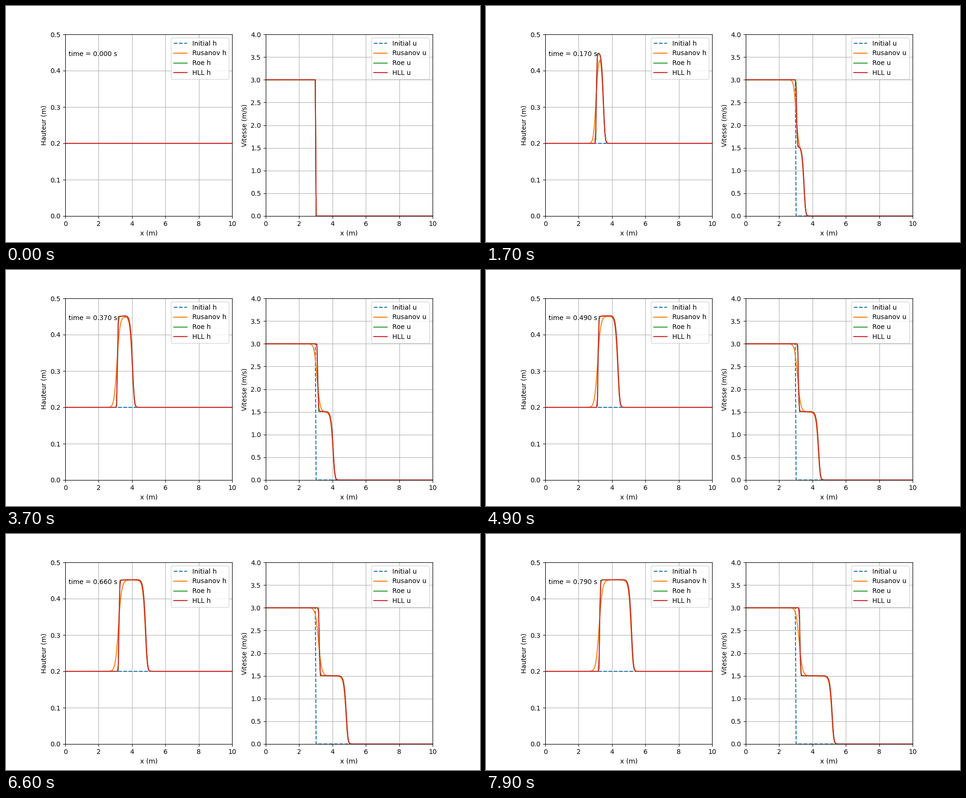
These frames come from a looping animation (1000x500 px, 8000 ms). A matplotlib script:

```python
import numpy as np
import matplotlib.pyplot as plt
from matplotlib.animation import FuncAnimation

G = 9.81
CELLS, LENGTH = 200, 10.0
DX = LENGTH / CELLS
DT, SUBSTEPS = 0.001, 10
FRAMES, INTERVAL = 80, 100

x = (np.arange(CELLS) + 0.5) * DX
h0 = np.full(CELLS, 0.2)
u0 = np.where(x < 3, 3.0, 0.0)


def flux(h, u):
    return np.array([h * u, h * u**2 + G * h**2 / 2])


def state(h, u):
    return np.array([h, h * u])


def rusanov(hl, ul, hr, ur):
    a = np.maximum(abs(ul) + np.sqrt(G * hl), abs(ur) + np.sqrt(G * hr))
    mean = (flux(hl, ul) + flux(hr, ur)) / 2
    return mean - a / 2 * (state(hr, ur) - state(hl, ul))


def roe(hl, ul, hr, ur):
    sl, sr = np.sqrt(hl), np.sqrt(hr)
    u = (sl * ul + sr * ur) / (sl + sr)
    c = np.sqrt(G * (hl + hr) / 2)
    dh, dq = state(hr, ur) - state(hl, ul)
    l1, l2 = u - c, u + c
    w1 = abs(l1) * (l2 * dh - dq) / (2 * c)
    w2 = abs(l2) * (dq - l1 * dh) / (2 * c)
    mean = (flux(hl, ul) + flux(hr, ur)) / 2
    return mean - np.array([w1 + w2, l1 * w1 + l2 * w2]) / 2


def hll(hl, ul, hr, ur):
    cl, cr = np.sqrt(G * hl), np.sqrt(G * hr)
    sl = np.minimum(np.minimum(ul - cl, ur - cr), 0)
    sr = np.maximum(np.maximum(ul + cl, ur + cr), 0)
    jump = state(hr, ur) - state(hl, ul)
    return (sr * flux(hl, ul) - sl * flux(hr, ur) + sl * sr * jump) / (sr - sl)


def solve(scheme):
    """Return (h, u) for every frame."""
    w = state(h0, u0)
    history = []
    for _ in range(FRAMES):
        history.append((w[0].copy(), w[1] / w[0]))
        for _ in range(SUBSTEPS):
            h = np.pad(w[0], 1, mode="edge")
            u = np.pad(w[1], 1, mode="edge") / h
            f = scheme(h[:-1], u[:-1], h[1:], u[1:])
            w = w - DT / DX * (f[:, 1:] - f[:, :-1])
    return history


schemes = {"Rusanov": rusanov, "Roe": roe, "HLL": hll}
results = [solve(s) for s in schemes.values()]

fig, axes = plt.subplots(1, 2, figsize=(10, 5), dpi=100)
panels = [("h", "Hauteur (m)", h0, 0.5), ("u", "Vitesse (m/s)", u0, 4.0)]
curves = []
for ax, (name, label, start, top) in zip(axes, panels):
    ax.plot(x, start, "--", label=f"Initial {name}")
    curves.append([ax.plot(x, start, label=f"{s} {name}")[0] for s in schemes])
    ax.set(xlim=(0, LENGTH), ylim=(0, top), xlabel="x (m)", ylabel=label)
    ax.grid(True)
    ax.legend(loc="upper right")
clock = axes[0].text(0.02, 0.88, "", transform=axes[0].transAxes)


def update(i):
    for k, lines in enumerate(curves):
        for line, result in zip(lines, results):
            line.set_ydata(result[i][k])
    clock.set_text(f"time = {i * DT * SUBSTEPS:.3f} s")
    return [*curves[0], *curves[1], clock]


anim = FuncAnimation(fig, update, frames=FRAMES, interval=INTERVAL,
                     repeat=True, repeat_delay=0)
plt.show()
```
